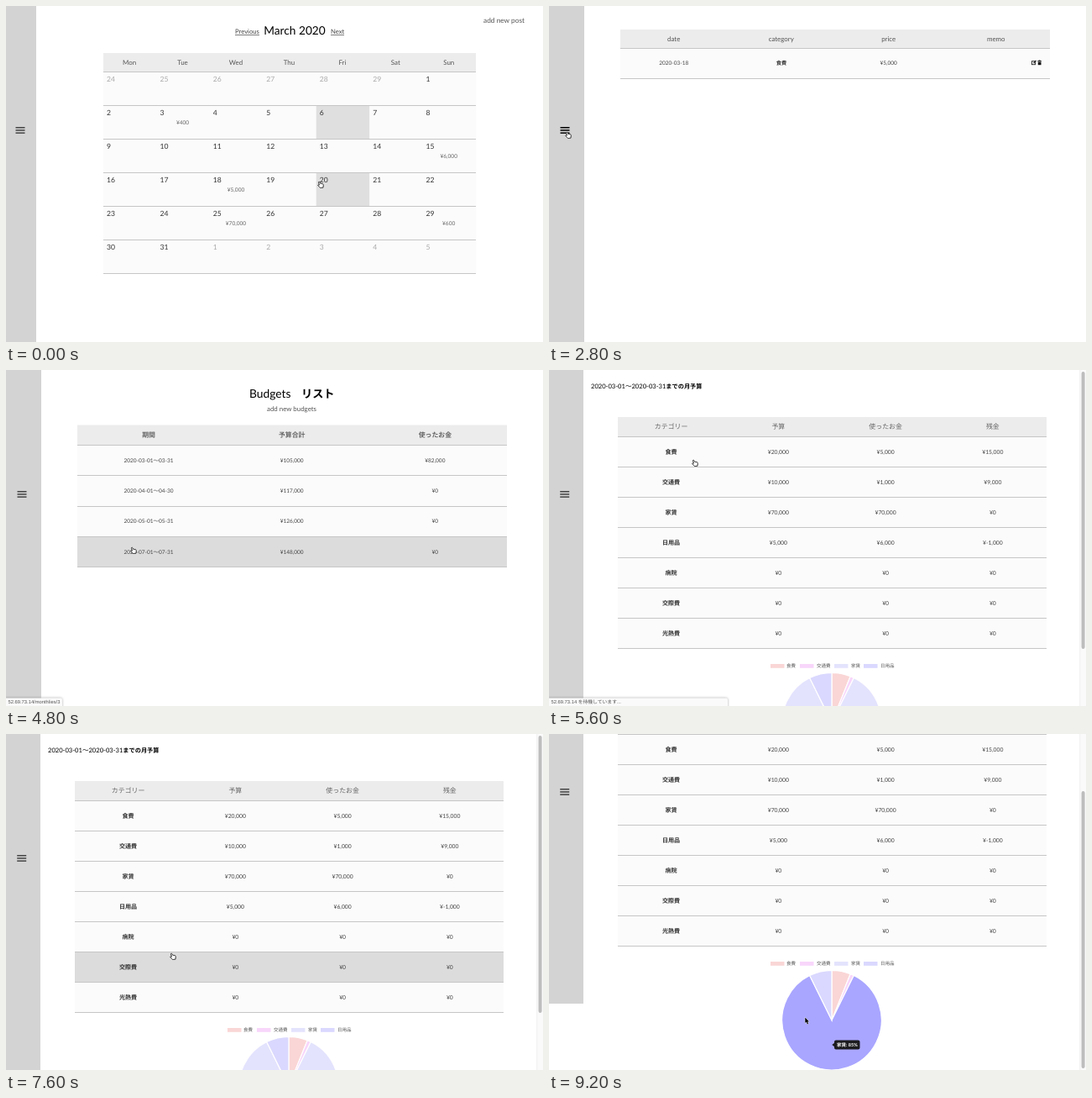
An HTML page with a canvas for the animation above (9600 ms loop, 640 by 400 pixels).

```html
<!DOCTYPE html>
<html lang="ja">
<head>
<meta charset="utf-8">
<style>
  html, body { margin: 0; width: 100%; height: 100%; overflow: hidden; background: #fff; }
  canvas { display: block; }
</style>
</head>
<body>
<canvas id="stage" width="640" height="400"></canvas>
<script>
const ctx = document.getElementById('stage').getContext('2d');
ctx.textRendering = 'geometricPrecision';
const FONT = 'Lato, "Noto Sans CJK JP", "Noto Sans CJK", sans-serif';
const UI_FONT = '"Liberation Sans", "Noto Sans CJK JP", "Noto Sans CJK", sans-serif';
const LINE = '#c6c6c6';
const HOST = '52.69.73.14';
const WAITING = HOST + ' を待機しています...';
const STEP = 400;

// y is the vertical middle of the capitals; returns the right edge
function text(str, x, y, size, { color = '#333', align = 'left', weight = 400, font = FONT } = {}) {
  ctx.font = `${weight} ${size}px ${font}`;
  ctx.textAlign = align;
  ctx.fillStyle = color;
  ctx.fillText(str, x, y + size * 0.36);
  return x + ctx.measureText(str).width;
}

function rect(x, y, w, h, color) {
  ctx.fillStyle = color;
  ctx.fillRect(x, y, w, h);
}

function sidebar(width, iconX, dark) {
  rect(0, 0, width, 400, '#d3d3d3');
  for (const y of [144, 147.2, 150.4]) rect(iconX - 5.5, y, 11, 1.5, dark ? '#000' : '#444');
}

function table({ x, y, width, headH, rowH, heads, rows, hover = -1, head = {}, size, boldFirst }) {
  const col = width / heads.length;
  const top = y + headH;
  const middle = i => x + col * (i + 0.5) - 0.3;
  rect(x, y, width, headH, '#ececec');
  heads.forEach((h, i) => text(h, middle(i), y + headH / 2 - 0.3, 7.9,
    { color: '#555', align: 'center', ...head }));
  rows.forEach((row, r) => {
    const rowY = top + r * rowH;
    rect(x, rowY, width, rowH, r === hover ? '#dcdcdc' : '#fbfbfb');
    row.forEach((cell, i) => {
      const bold = boldFirst && i === 0;
      text(cell, middle(i), rowY + rowH / 2 - 0.3, bold ? size + 0.3 : size,
        { align: 'center', color: bold ? '#333' : '#444', weight: bold ? 700 : 400 });
    });
  });
  for (let r = 0; r <= rows.length; r++) rect(x, Math.round(top + r * rowH - 0.5), width, 1, LINE);
}

function calendar({ hover }) {
  const x0 = 116, y0 = 79, col = 444 / 7, rowH = 40;
  const prices = { 3: '¥400', 15: '¥6,000', 18: '¥5,000', 25: '¥70,000', 29: '¥600' };
  sidebar(36, 17);
  text('Previous', 273, 30.5, 7.7, { color: '#444' });
  rect(273, 34, 29, 0.7, '#444');
  text('March 2020', 344, 29.5, 13.7, { align: 'center', color: '#000' });
  text('Next', 387, 30.5, 7.7, { color: '#444' });
  rect(387, 34, 16, 0.7, '#444');
  text('add new post', 618, 17.5, 8.3, { align: 'right', color: '#555' });
  rect(x0, 56, 444, 23, '#ececec');
  'Mon Tue Wed Thu Fri Sat Sun'.split(' ').forEach((name, i) =>
    text(name, x0 + col * (i + 0.5) - 0.6, 67, 7.9, { align: 'center', color: '#555' }));
  for (let i = 0; i < 42; i++) {
    const x = x0 + (i % 7) * col, y = y0 + Math.floor(i / 7) * rowH;
    const date = i - 5;
    const inside = date >= 1 && date <= 31;
    const label = date < 1 ? date + 29 : inside ? date : date - 31;
    rect(x, y, col + 0.5, rowH, date === 6 || date === hover ? '#dfdfdf' : '#fbfbfb');
    text(String(label), x + 4, y + 8.3, 8.6, { color: inside ? '#333' : '#aaa' });
    if (inside && prices[date]) text(prices[date], x + col / 2 - 0.6, y + 19.5, 6.6, { align: 'center', color: '#666' });
  }
  for (let r = 0; r < 7; r++) rect(x0, y0 - 1 + r * rowH, 444, 1, LINE);
}

function dayList({ dark, width = 42 }) {
  sidebar(width, 19, dark);
  ctx.save();
  ctx.translate(width - 42, 0);
  table({ x: 85, y: 28, width: 512, headH: 22, rowH: 36, size: 6.5,
    heads: ['date', 'category', 'price', 'memo'], rows: [['2020-03-18', '', '¥5,000', '']] });
  text('食費', 277, 67.5, 6.2, { align: 'center', weight: 700 });
  // edit and delete icons
  ctx.lineWidth = 0.9;
  ctx.strokeStyle = '#222';
  ctx.strokeRect(575.5, 65.7, 4, 4);
  ctx.lineWidth = 1.3;
  ctx.beginPath();
  ctx.moveTo(577.5, 68);
  ctx.lineTo(580.5, 65);
  ctx.stroke();
  rect(582.3, 65.2, 4.6, 1, '#111');
  rect(583.6, 64.5, 2, 0.8, '#111');
  rect(582.8, 66.6, 3.7, 3.6, '#111');
  ctx.restore();
}

const KANJI_HEAD = { weight: 700, color: '#666' };

function budgets({ hover }) {
  sidebar(42, 19);
  text('Budgets', 290, 28, 13.8, { color: '#000' });
  text('リスト', 352, 28, 13.2, { color: '#000', weight: 700 });
  text('add new budgets', 340.5, 46.3, 7.9, { align: 'center', color: '#555' });
  table({ x: 85, y: 65.5, width: 512, headH: 24, rowH: 36.3, size: 6.5, head: KANJI_HEAD, hover,
    heads: ['期間', '予算合計', '使ったお金'],
    rows: [
      ['2020-03-01〜03-31', '¥105,000', '¥82,000'],
      ['2020-04-01〜04-30', '¥117,000', '¥0'],
      ['2020-05-01〜05-31', '¥126,000', '¥0'],
      ['2020-07-01〜07-31', '¥148,000', '¥0']
    ] });
}

function pie(active) {
  const slices = [
    ['食費', 5, '#fad6d6', 264, 283], ['交通費', 1, '#f8d6fb', 299, 319],
    ['家賃', 70, '#e4e3fd', 340, 360], ['日用品', 6, '#dad8fe', 375, 395]
  ];
  let angle = -Math.PI / 2;
  slices.forEach(([name, value, color, boxX, labelX], i) => {
    rect(boxX, 350, 16.5, 4.8, color);
    text(name, labelX, 352.4, 5.5, { color: '#555' });
    const end = angle + value / 82 * Math.PI * 2;
    ctx.beginPath();
    ctx.moveTo(337, 419.7);
    ctx.arc(337, 419.7, 59.3, angle, end);
    ctx.closePath();
    ctx.fillStyle = active && i === 2 ? '#a9a6ff' : color;
    ctx.fill();
    ctx.strokeStyle = '#fff';
    ctx.lineWidth = 1.2;
    ctx.stroke();
    angle = end;
  });
  if (!active) return;
  ctx.fillStyle = '#1c1c1f';
  ctx.beginPath();
  ctx.roundRect(340, 443.5, 30.5, 11, 2);
  ctx.moveTo(337.3, 449);
  ctx.lineTo(340.5, 446.5);
  ctx.lineTo(340.5, 451.5);
  ctx.fill();
  text('家賃: 85%', 343, 449, 5.5, { color: '#fff', weight: 700 });
}

function month({ hover, scroll = 0, active }) {
  ctx.save();
  ctx.translate(0, -scroll);
  sidebar(41, 18.7);
  const end = text('2020-03-01〜2020-03-31', 50, 19.3, 7.6, { color: '#000' });
  text('までの月予算', end, 19.3, 7.2, { color: '#000', weight: 700 });
  table({ x: 82, y: 56, width: 511, headH: 23.5, rowH: 36, size: 6.8, head: { ...KANJI_HEAD, weight: 500 }, boldFirst: true, hover,
    heads: ['カテゴリー', '予算', '使ったお金', '残金'].map(h => h),
    rows: [
      ['食費', '¥20,000', '¥5,000', '¥15,000'],
      ['交通費', '¥10,000', '¥1,000', '¥9,000'],
      ['家賃', '¥70,000', '¥70,000', '¥0'],
      ['日用品', '¥5,000', '¥6,000', '¥-1,000'],
      ...['病院', '交際費', '光熱費'].map(name => [name, '¥0', '¥0', '¥0'])
    ] });
  pie(active);
  ctx.restore();
  rect(633, 0, 7, 400, '#fafafa');
  rect(632.5, 0, 0.7, 400, '#e8e8e8');
  ctx.fillStyle = '#bdbdbd';
  ctx.beginPath();
  ctx.roundRect(634.6, 2 + scroll * 66 / 79, 4, 330, 2);
  ctx.fill();
}

function statusBar(str) {
  const width = str === WAITING ? 213 : str.endsWith('s') ? 62 : 67;
  ctx.save();
  ctx.shadowColor = 'rgba(0,0,0,.35)';
  ctx.shadowBlur = 3;
  ctx.fillStyle = '#fafafa';
  ctx.beginPath();
  ctx.roundRect(-3, 390.5, width + 3, 13, 2);
  ctx.fill();
  ctx.restore();
  text(str, 2.5, 395.3, 5.8, { color: '#555', font: UI_FONT });
}

const HAND = new Path2D('M-2.4 -3.4 Q-1.6 -4.1 -.9 -3 L-.2 -1.6 L2.2 -1.4 Q3.3 -.9 3.2 .5 L2.8 3.2 L-.5 3.5 L-3.1 .7 Q-3.1 -.3 -2 0 L-1.5 .2 Z');
const ARROW = new Path2D('M0 0 V6.6 L1.5 5.3 L2.6 7.9 L3.8 7.4 L2.7 4.9 H4.7 Z');

function cursor(shape, x, y) {
  const hand = shape === HAND;
  ctx.save();
  ctx.translate(x, y);
  ctx.lineWidth = 0.8;
  ctx.strokeStyle = hand ? '#333' : '#fff';
  ctx.fillStyle = hand ? '#fff' : '#000';
  ctx.stroke(shape);
  ctx.fill(shape);
  if (hand) ctx.stroke(shape);
  ctx.restore();
}

// page, options, cursor, cursor x, cursor y, status text
const scenes = [
  [calendar, { hover: 20 }, HAND, 375, 213],
  [calendar, {}, HAND, 198, 92],
  [calendar, {}, ARROW, 191, 64],
  [calendar, { hover: 18 }, HAND, 265, 212],
  [dayList, {}, HAND, 265, 212, WAITING],
  [dayList, {}, ARROW, 277, 76],
  [dayList, {}, ARROW, 219, 76],
  [dayList, { dark: true }, HAND, 23, 154],
  [dayList, { width: 64 }, HAND, 24, 155, HOST + '/monthlies'],
  [dayList, { width: 85 }, HAND, 26, 157, HOST + '/monthlies'],
  [budgets, {}, HAND, 26, 157, HOST + '/monthlies'],
  [budgets, { hover: 0 }, HAND, 140, 110, HOST + '/monthlies/1'],
  [budgets, { hover: 3 }, HAND, 152, 215, HOST + '/monthlies/3'],
  [budgets, {}, HAND, 174, 111, HOST + '/monthlies/1'],
  [month, {}, HAND, 174, 111, WAITING],
  [month, {}, ARROW, 68, 25],
  [month, {}, ARROW, 168, 31],
  [month, {}, ARROW, 176, 67],
  [month, { hover: 3 }, HAND, 190, 238],
  [month, { hover: 5 }, HAND, 199, 265],
  [month, { hover: 6 }, HAND, 190, 313],
  [month, { scroll: 40 }, ARROW, 160, 310],
  [month, { scroll: 79 }, ARROW, 150, 300],
  [month, { scroll: 79, active: true }, ARROW, 305.3, 337.5]
];

function draw(now) {
  const [page, options, shape, x, y, status] = scenes[Math.floor(now / STEP) % scenes.length];
  rect(0, 0, 640, 400, '#fff');
  page(options);
  if (status) statusBar(status);
  cursor(shape, x, y);
  requestAnimationFrame(draw);
}
requestAnimationFrame(draw);
</script>
</body>
</html>
```
